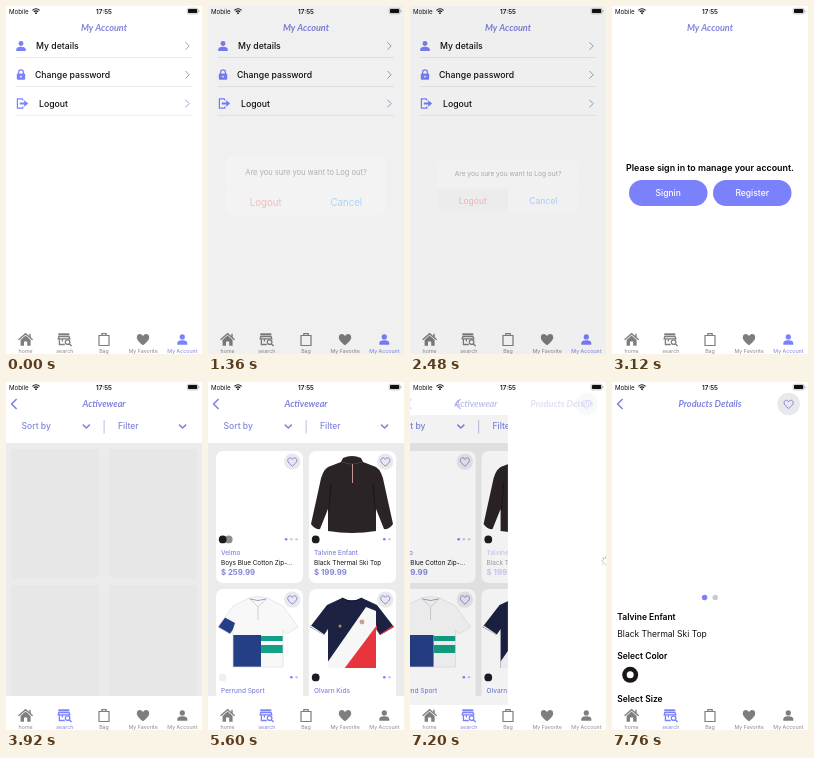
Recreate the animation shown at these times as an HTML page with a canvas. Size 196 px wide and 348 px high, loop 8000 ms.

```html
<!DOCTYPE html>
<html lang="en">
<head>
<meta charset="utf-8">
<style>
html, body { margin: 0; width: 100%; height: 100%; overflow: hidden; background: #fff; }
canvas { display: block; width: 196px; height: 348px; }
</style>
</head>
<body>
<canvas id="stage"></canvas>
<script>
const W = 196, H = 348, LOOP = 8000, STEP = 80;
const BLUE = '#7b80fb', SOFT = '#7f84dd', INK = '#111', GREY = '#7e7e7e';
const UI = 'Inter, Roboto, sans-serif', TITLE = 'Lato, sans-serif';
const canvas = document.getElementById('stage');
const c = canvas.getContext('2d');
const dpr = Math.max(1, window.devicePixelRatio || 1);
canvas.width = W * dpr;
canvas.height = H * dpr;

// Critically damped spring from 0 to 1.
function spring(ms, k) {
  const x = Math.max(0, ms) / 1000 * k;
  return 1 - (1 + x) * Math.exp(-x);
}

function layer(x, y, alpha, draw) {
  c.save();
  c.translate(x, y);
  c.globalAlpha *= Math.max(0, Math.min(1, alpha));
  draw();
  c.restore();
}

function clipped(x, y, w, h, draw) {
  c.save();
  c.beginPath();
  c.rect(x, y, w, h);
  c.clip();
  draw();
  c.restore();
}

function text(s, x, y, size, color = INK, weight = 500, align = 'left') {
  c.font = `${weight} ${size}px ${UI}`;
  c.textAlign = align;
  c.fillStyle = color;
  c.fillText(s, x, y);
}

function title(s, x) {
  c.font = `italic 700 9.1px ${TITLE}`;
  c.textAlign = 'center';
  c.fillStyle = SOFT;
  c.fillText(s, x, 25);
}

function rect(x, y, w, h, color) {
  c.fillStyle = color;
  c.fillRect(x, y, w, h);
}

function round(x, y, w, h, r, color) {
  c.beginPath();
  c.roundRect(x, y, w, h, r);
  c.fillStyle = color;
  c.fill();
}

function dot(x, y, r, color) {
  c.beginPath();
  c.arc(x, y, r, 0, 7);
  c.fillStyle = color;
  c.fill();
}

function stroke(d, color, width = 1) {
  c.strokeStyle = color;
  c.lineWidth = width;
  c.stroke(new Path2D(d));
}

function fill(d, color) {
  c.fillStyle = color;
  c.fill(new Path2D(d), 'evenodd');
}

const HEART = 'M0 5.6C-3 3-6.2 .6-6.2-2.3C-6.2-6-1.6-6.8 0-3.5C1.6-6.8 6.2-6 6.2-2.3C6.2 .6 3 3 0 5.6Z';

function heartButton(x, y, r) {
  dot(x, y, r, '#e9e9ec');
  layer(x, y + .4, 1, () => {
    c.scale(.74, .74);
    stroke(HEART, SOFT, 1.3);
  });
}

function person(x, y, s, color) {
  layer(x, y, 1, () => {
    c.scale(s, s);
    dot(0, -2.6, 2.6, color);
    fill('M-5 5.2V3.6C-5 1.5-2 .8 0 .8S5 1.5 5 3.6V5.2Z', color);
  });
}

function statusBar() {
  text('Mobile', 3, 7.7, 6.2, INK, 400);
  stroke('M26.4 4.3Q30 1.1 33.6 4.3M27.8 5.8Q30 3.9 32.2 5.8', INK, 1.1);
  dot(30, 7.2, .9, INK);
  text('17:55', 98, 7.8, 6.3, INK, 600, 'center');
  c.beginPath();
  c.roundRect(181.2, 2.3, 10.8, 5.6, 1.4);
  c.strokeStyle = '#888';
  c.lineWidth = .5;
  c.stroke();
  round(182, 3.1, 9.2, 4, .8, INK);
  round(192.6, 4.2, .7, 1.8, .3, '#888');
}

function tabBar(active) {
  const tint = (i) => i === active ? BLUE : GREY;
  const names = ['home', 'search', 'Bag', 'My Favorite', 'My Account'];
  names.forEach((s, i) => text(s, 19.6 + i * 39.2, 347, 5.3, i === active ? SOFT : '#8a8a8a', 400, 'center'));
  layer(19.6, 333.5, 1, () => {
    fill('M0-4L5 .5V6.2H1.6V2H-1.6V6.2H-5V.5Z', GREY);
    stroke('M-7 .3L0-5.8L7 .3M4.4-5.8V-2', GREY, 1.4);
  });
  layer(58.8, 333.5, 1, () => {
    const t = tint(1);
    rect(-6.5, -6.2, 11, 2, t);
    stroke('M-6-3L-6.6-.6H5L4.2-3ZM-5.4 0V5H0M-2.4 0V2', t, 1.3);
    c.beginPath();
    c.arc(2.8, 2.6, 2.3, 0, 7);
    c.stroke();
    stroke('M4.4 4.2L6.8 6.4', t, 1.4);
  });
  layer(98, 333.5, 1, () => stroke('M-5-4H5V6H-5ZM-2.2-4V-5.8H2.2V-4', GREY, 1.2));
  layer(137, 333.7, 1, () => fill(HEART, GREY));
  person(176.3, 333.5, 1, tint(4));
}

function accountList() {
  title('My Account', 98);
  person(15, 40, .95, BLUE);
  layer(15, 69, 1, () => {
    round(-4.2, -1.6, 8.4, 6.4, 1, BLUE);
    stroke('M-2.4-1V-2.8A2.4 2.4 0 0 1 2.4-2.8V-1', BLUE, 1.2);
    dot(0, 1.6, .9, '#fff');
  });
  layer(15.8, 97.5, 1, () => {
    stroke('M1-4.6H-4.4V4.6H1V3M1-4.6V-3', BLUE, 1.2);
    fill('M-2-1H2.4V-3.2L6.4 0L2.4 3.2V1H-2Z', BLUE);
  });
  [['My details', 30], ['Change password', 29], ['Logout', 33]].forEach(([s, x], i) => {
    const y = 40 + i * 28.8;
    text(s, x, y + 2.9, 8.7);
    stroke(`M179.4 ${y - 3.8}L183.2 ${y}L179.4 ${y + 3.8}`, '#9094c4', .9);
    rect(10, y + 11.3, 176, .7, '#e6e6ea');
  });
}

function alertBox(alpha, scale, pressed) {
  layer(0, 0, alpha, () => {
    rect(0, 0, W, H, 'rgba(0,0,0,.2)');
    c.translate(98, 179.5);
    c.scale(scale, scale);
    round(-70.6, -26.2, 141.2, 52.4, 7.3, 'rgba(246,246,246,.96)');
    if (pressed) {
      c.beginPath();
      c.roundRect(-70.6, 3.4, 70.6, 22.8, [0, 0, 0, 7.3]);
      c.fillStyle = 'rgba(0,0,0,.06)';
      c.fill();
    }
    rect(-70.6, 3.2, 141.2, .4, 'rgba(0,0,0,.1)');
    rect(-.2, 3.4, .4, 22.8, 'rgba(0,0,0,.1)');
    text('Are you sure you want to Log out?', 0, -9.3, 6.6, INK, 400, 'center');
    text('Logout', -35.3, 18.4, 8.5, '#f0363a', 400, 'center');
    text('Cancel', 35.3, 18.4, 8.5, '#0a84ff', 400, 'center');
  });
}

function signIn() {
  title('My Account', 98);
  text('Please sign in to manage your account.', 98, 165.3, 8.9, '#000', 600, 'center');
  [['Signin', 17], ['Register', 101]].forEach(([s, x]) => {
    round(x, 174, 78.5, 26, 13, BLUE);
    text(s, x + 39.2, 190.2, 8.5, '#fff', 500, 'center');
  });
}

function backArrow() {
  stroke('M10.6 17L5.6 22L10.6 27', SOFT, 1.6);
}

function jacket() {
  fill('M34 7Q43 3 52 7L54 11L67 16Q73 20 75 32L84 73Q80 79 75 78L67 58V80Q43 84 19 80V58L11 78Q6 79 2 73L11 32Q13 20 19 16L32 11Z', '#2b2427');
  stroke('M20 60L22 32M66 60L64 32', '#171416', .8);
  stroke('M33 11Q43 15 53 11', '#4a4446', .8);
  stroke('M43.5 13V32', '#d9a3a8', .9);
}

function polo() {
  const body = 'M33 9Q42 6 51 9L67 17L82 38L70 45L67 41V78H17V41L14 45L2 38L17 17Z';
  fill(body, '#f8f8f9');
  c.save();
  c.clip(new Path2D(body));
  rect(16, 46, 29, 33, '#243f86');
  rect(45, 47, 23, 5, '#12a184');
  rect(45, 56, 23, 8, '#12a184');
  fill('M1 39L8 28L19 34L15 46Z', '#243f86');
  c.restore();
  stroke(body, '#dfdfe3', .7);
  stroke('M33 9L42 18L51 9M42 18V31', '#c9ccd6', .9);
  stroke('M34 10Q42 13 50 10', '#8d97b4', .9);
}

function tee() {
  const body = 'M33 9Q43 15 53 9L68 16L85 38L71 46L67 40V79H19V40L15 46L1 38L18 16Z';
  fill(body, '#1d2243');
  c.save();
  c.clip(new Path2D(body));
  fill('M57 18L67 22V40L36 80H18V74Z', '#f7f7f8');
  fill('M68 36V80H35Z', '#e8343c');
  stroke('M0 36L16 47', '#f1f1f1', 1.6);
  stroke('M86 36L70 47', '#e8343c', 1.6);
  c.restore();
  stroke('M33 9Q43 15 53 9', '#11183a', 1.3);
  dot(31, 37, 1.5, '#a98f5f');
  dot(53, 33, 2.4, '#c9a08e');
}

const GOODS = [
  { brand: 'Velmo', name: 'Boys Blue Cotton Zip-...', price: '$ 259.99', tones: ['#8d8d8d', '#1c1c1c'], pages: 3 },
  { brand: 'Talvine Enfant', name: 'Black Thermal Ski Top', price: '$ 199.99', tones: ['#1c1c1c'], pages: 2, art: jacket },
  { brand: 'Perrund Sport', tones: ['#f0f0f2'], pages: 2, art: polo },
  { brand: 'Olvarn Kids', tones: ['#1a1c26'], pages: 2, art: tee }
];

function card(item, i, pressed) {
  layer(8 + i % 2 * 93, 69 + (i >> 1) * 138, 1, () => {
    round(0, 0, 87, 132, 7, '#fff');
    if (item.art) item.art();
    heartButton(76.3, 10.6, 8.2);
    item.tones.forEach((tone, n) => dot(6.7 + 6 * (item.tones.length - 1 - n), 88.4, 3.9, tone));
    for (let n = 0; n < item.pages; n++) {
      dot(80.5 - 5.2 * (item.pages - 1 - n), 88.3, 1.3, n ? '#c9cbe6' : BLUE);
    }
    layer(0, 0, pressed ? .4 : 1, () => {
      text(item.brand, 5, 104.2, 6.5, SOFT);
      if (!item.name) return;
      text(item.name, 5, 113.5, 6.4, INK, 400);
      text(item.price, 5, 124, 7.8, SOFT, 700);
    });
  });
}

function catalogue(loaded, pressed = -1) {
  text('Sort by', 15.6, 47.4, 8.5, SOFT);
  text('Filter', 112, 47.4, 8.5, SOFT);
  rect(97.6, 38, 1, 13.5, '#b9bce8');
  for (const x of [80.3, 176.6]) stroke(`M${x - 3.5} 42.6L${x} 46L${x + 3.5} 42.6`, SOFT, 1.5);
  clipped(0, 61, W, 253, () => {
    rect(0, 61, W, 253, '#ebebeb');
    if (loaded) return GOODS.forEach((item, i) => card(item, i, i === pressed));
    for (let i = 0; i < 4; i++) {
      round(5 + i % 2 * 98, 67 + (i >> 1) * 136, 88, 129, 4, '#e7e7e7');
    }
  });
}

function spinner(x, y, ms) {
  const lead = Math.floor(ms / 80) % 8;
  for (let i = 0; i < 8; i++) {
    layer(x, y, 1 - (lead - i + 8) % 8 * .1, () => {
      c.rotate(i * Math.PI / 4);
      round(-.6, -5, 1.2, 2.8, .6, '#9a9a9e');
    });
  }
}

function details() {
  dot(92.6, 215.5, 2.7, BLUE);
  dot(103.2, 215.5, 2.7, '#c8c8d2');
  text(GOODS[1].brand, 5.3, 238, 8.5, '#000', 600);
  text(GOODS[1].name, 5.3, 254.6, 8.5, INK, 400);
  text('Select Color', 5.3, 276.8, 8.5, '#000', 600);
  dot(18.2, 292.8, 8, '#1b1718');
  dot(18.2, 292.8, 3.5, '#fff');
  text('Select Size', 5.3, 320, 8.5, '#000', 600);
}

function push(t) {
  const p = t >= 7600 ? 1 : spring(t - 7060, 12);
  const x = W * (1 - p);
  clipped(0, 33, W, 290, () => {
    layer(-.3 * W * p, 0, 1, () => catalogue(true, 1));
    rect(0, 33, W, 290, `rgba(0,0,0,${.1 * p})`);
    rect(x, 33, W, 290, '#fff');
  });
  layer(-18 * p, 0, (1 - p) ** 2, backArrow);
  layer(-64 * p, 0, 1 - p, () => title('Activewear', 98));
  layer(80 * (1 - p), 0, p, backArrow);
  layer(108 * (1 - p), 0, p * p, () => title('Products Details', 98));
  layer(0, 0, p * p, () => heartButton(176.6, 22, 11.3));
  if (t < 7760) spinner(x + 98, 179, t);
  else details();
}

function draw(t) {
  c.setTransform(dpr, 0, 0, dpr, 0, 0);
  rect(0, 0, W, H, '#fff');
  if (t < 3040) accountList();
  else if (t < 3920) signIn();
  else if (t < 7120) {
    catalogue(t >= 5600);
    backArrow();
    title('Activewear', 98);
  } else push(t);
  statusBar();
  tabBar(t < 3920 ? 4 : 1);
  if (t >= 1360 && t < 2800) {
    const shown = t < 1760 ? spring(t - 1300, 18) : 1;
    const gone = t < 2400 ? 0 : spring(t - 2350, 18);
    alertBox(shown * (1 - gone), 1.2 - .2 * shown, t >= 2080);
  }
}

function tick() {
  const t = performance.now() % LOOP;
  draw(Math.floor(t / STEP) * STEP);
  requestAnimationFrame(tick);
}
tick();
</script>
</body>
</html>
```
